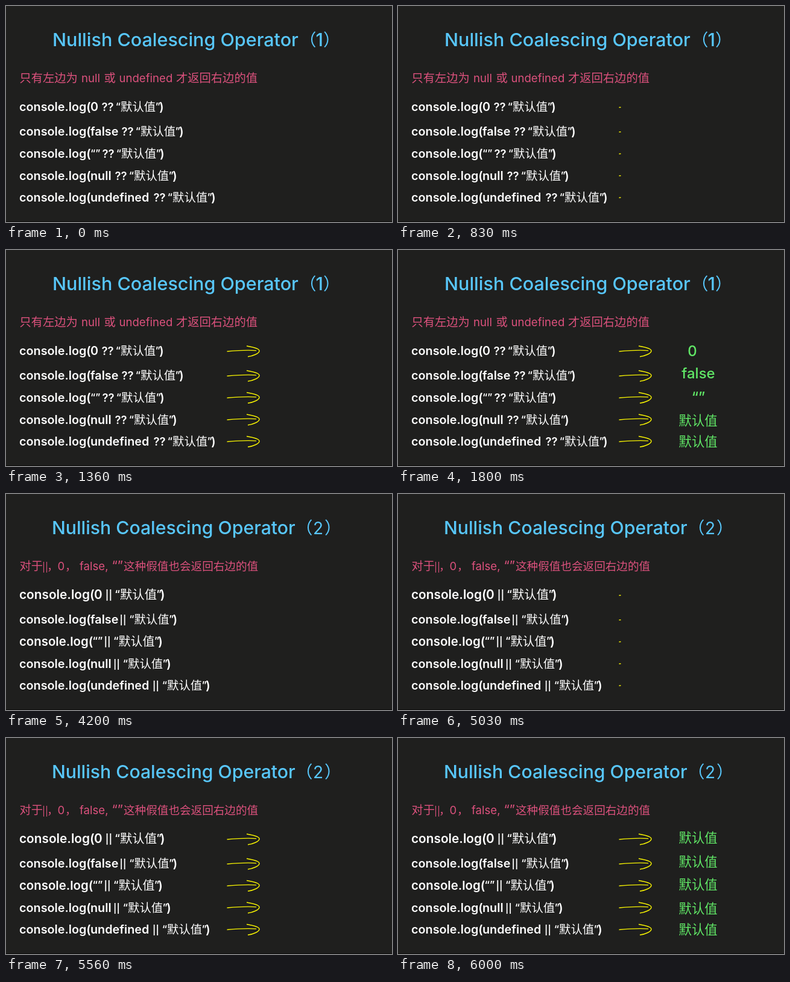
Animation of 640x360 px, one loop 8460 ms. Source, as an HTML page:

```html
<!DOCTYPE html>
<html lang="zh-CN">
<head>
<meta charset="utf-8">
<title>Nullish Coalescing Operator</title>
<style>
  html, body { margin: 0; width: 100%; height: 100%; overflow: hidden; background: #1f1f1e; }
  svg { display: block; width: 100vw; height: 100vh; }
  text {
    font-family: Inter, "Noto Sans CJK SC", "Noto Sans CJK JP", sans-serif;
    font-optical-sizing: none;
    white-space: pre;
  }
  .title { fill: #58c7fb; font-weight: 500; }
  .thin { fill: #58c7fb; font-weight: 400; }
  .note { fill: #dc517d; font-weight: 400; }
  .code { fill: #fff; font-weight: 600; }
  .han { fill: #fff; font-weight: 400; }
  .result { fill: #60e666; font-weight: 500; }
  .resultHan { fill: #60e666; font-weight: 400; }
  .arrow { fill: none; stroke: #f8f400; stroke-width: 1.4; }
</style>
</head>
<body>
<svg id="stage" viewBox="0 0 640 360">
  <defs>
    <g id="arrow" class="arrow">
      <path id="shaft" d="M366.5 169C382 167.6 399 166.4 415 167.6"/>
      <path id="head" d="M399 160C408 161.5 420.5 164 420 168.3C419.5 172.5 409 176.8 401 177.8"/>
    </g>
  </defs>
  <rect y="359" width="640" height="1" fill="#0c0c0c"/>
</svg>
<script>
const LOOP = 8460, SCENE_2 = 4200, DRAW_START = 767, DRAW_TIME = 593, RESULTS_AT = 1800;
const DEFAULT = "默认值";
const ROW_Y = [175, 216, 253, 289.5, 325.5];
const ARROW_Y = [0, 41, 77.5, 114, 150.5];
const HAN_RESULT_Y = [174, 214, 251.5, 292, 326.5];
const ARGS = ["0", "false", "“”", "null", "undefined"];

const stage = document.getElementById("stage");

function add(parent, tag, attributes = {}, content = "") {
  const node = document.createElementNS("http://www.w3.org/2000/svg", tag);
  for (const name in attributes) node.setAttribute(name, attributes[name]);
  node.textContent = content;
  return parent.appendChild(node);
}

function write(parent, style, content, x, y, size, anchor = "start") {
  add(parent, "text", { class: style, x, y, "font-size": size, "text-anchor": anchor }, content);
}

// One console.log line; hanX is where the default value begins.
function codeRow(parent, row, operator, hanX, scale) {
  const y = ROW_Y[row], size = 19.8 * scale, hanSize = 19.4 * scale;
  const quoteY = y - 2, quoteSize = size * 0.82;
  const hanEnd = hanX + 3 * hanSize;
  const quoted = ARGS[row] === "“”";
  write(parent, "code", "console.log(", 22, y, size);
  write(parent, "code", ARGS[row], 22 + 118 * scale, quoted ? quoteY : y, quoted ? quoteSize : size);
  write(parent, "code", operator.text, hanX - operator.gap, y - operator.lift, operator.size * scale, "middle");
  write(parent, "code", "“", hanX, quoteY, quoteSize, "end");
  write(parent, "han", DEFAULT, hanX, y, hanSize);
  write(parent, "code", "”", hanEnd - 0.5, quoteY, quoteSize);
  write(parent, "code", ")", hanEnd + 13.5, y, size, "end");
}

function makeScene({ titleX, titleSize, number, note, noteSize, operator, hanX, scales, results }) {
  const root = add(stage, "g");
  write(root, "title", "Nullish Coalescing Operator", titleX, 67, titleSize);
  for (const [style, content, x, size] of number) write(root, style, content, x, 67, size);
  for (const [content, x, size = noteSize] of note) write(root, "note", content, x, 127, size);
  hanX.forEach((x, row) => codeRow(root, row, operator, x, scales[row]));
  for (const y of ARROW_Y) add(root, "use", { href: "#arrow", y });

  const answers = add(root, "g");
  results.forEach((result, row) => {
    if (result) write(answers, "result", result.content, result.x, result.y, 24, "middle");
    else write(answers, "resultHan", DEFAULT, 465.5, HAN_RESULT_Y[row], 21.4);
  });
  return { root, answers };
}

const scenes = [
  makeScene({
    titleX: 77, titleSize: 30.5,
    number: [["thin", "（", 486.5, 28], ["title", "1", 513.5, 30], ["thin", "）", 526, 28]],
    note: [["只有左边为", 22.5], ["null", 125, 18.6], ["或", 162.5], ["undefined", 187.5, 18.6], ["才返回右边的值", 282]],
    noteSize: 19.3,
    operator: { text: "??", gap: 21.5, size: 18.5, lift: 0 },
    hanX: [190, 223, 191, 212, 276], scales: [1, 1, 1, 1, 1],
    results: [
      { content: "0", x: 488, y: 176.5 },
      { content: "false", x: 498, y: 214 },
      { content: "“”", x: 498, y: 253.5 },
      null, null
    ]
  }),
  makeScene({
    titleX: 76, titleSize: 30.2,
    number: [["thin", "（", 480.5, 28], ["thin", "2", 509, 28], ["thin", "）", 528, 28]],
    note: [["对于", 22.5, 19.2], ["||", 60, 15], ["，", 68], ["0", 85.5], ["，", 98], ["false,", 122], ["“”", 175.5, 21], ["这种假值也会返回右边的值", 195]],
    noteSize: 18.6,
    operator: { text: "||", gap: 18.5, size: 15, lift: 1 },
    hanX: [189, 212.5, 186.5, 202, 267], scales: [1.05, 1, 1.03, 1, 1],
    results: [null, null, null, null, null]
  })
];

const strokes = ["shaft", "head"].map(id => {
  const path = document.getElementById(id);
  return { path, length: path.getTotalLength() };
});

// The pen finishes the shaft before it moves on to the head.
function drawArrows(progress) {
  let ink = progress * strokes.reduce((sum, stroke) => sum + stroke.length, 0);
  for (const { path, length } of strokes) {
    const drawn = Math.min(Math.max(ink, 0), length);
    path.setAttribute("stroke-dasharray", drawn < length ? `${drawn} 200` : "none");
    path.setAttribute("visibility", drawn > 0 ? "visible" : "hidden");
    ink -= length;
  }
}

function render(now) {
  const time = now % LOOP;
  const current = time < SCENE_2 ? 0 : 1;
  const local = time - current * SCENE_2;
  scenes.forEach(({ root, answers }, index) => {
    root.setAttribute("display", index === current ? "inline" : "none");
    answers.setAttribute("display", local >= RESULTS_AT ? "inline" : "none");
  });
  const p = local < 800 ? 0 : Math.min((local - DRAW_START) / DRAW_TIME, 1);
  drawArrows(p * p * (3 - 2 * p));
}

const start = performance.now();
function tick() {
  render(performance.now() - start);
  requestAnimationFrame(tick);
}
tick();
</script>
</body>
</html>
```
